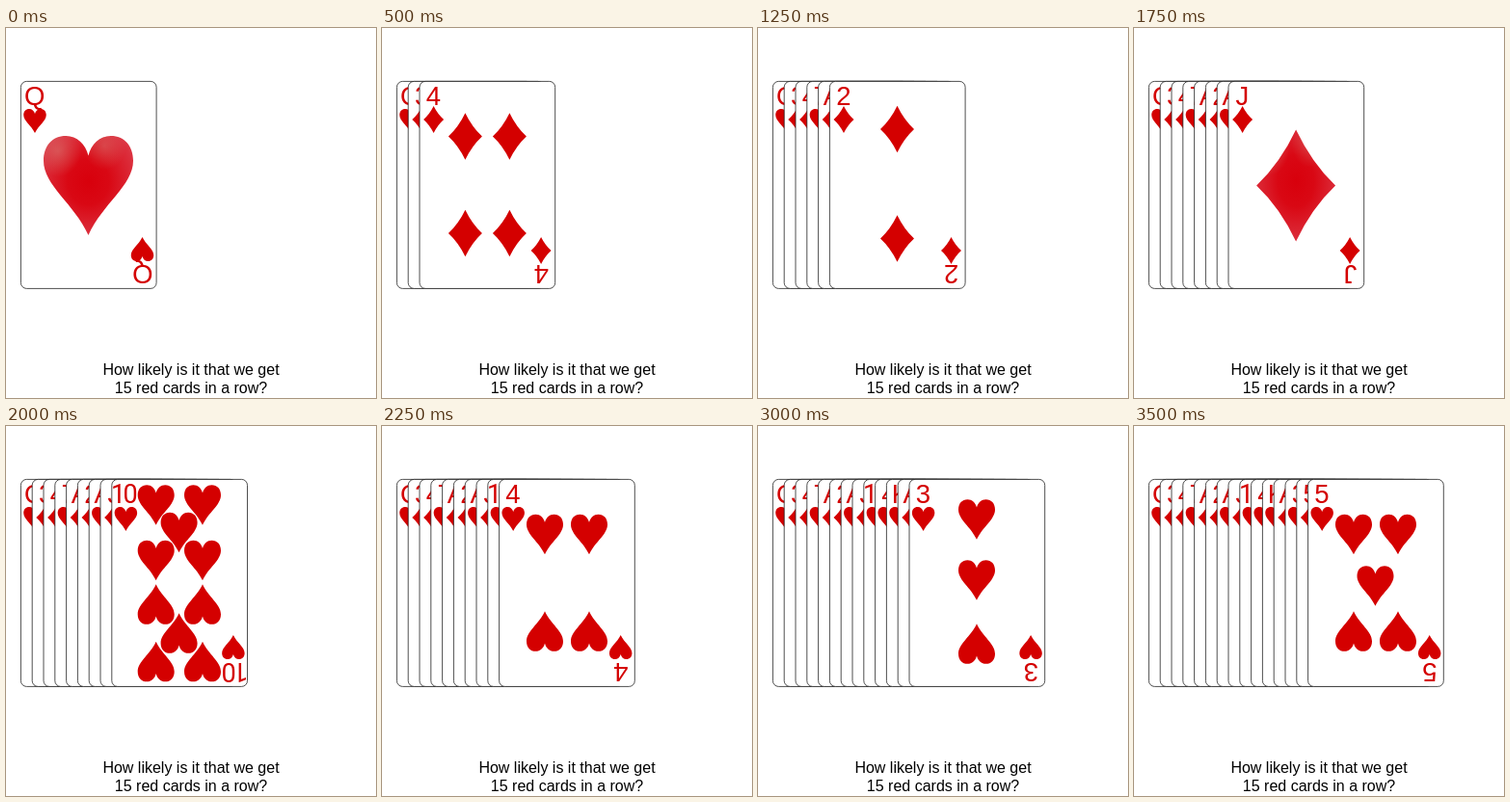
These frames come from a looping animation (384 px wide and 384 px high, 4 s). An HTML page:

```html
<!DOCTYPE html>
<html lang="en">
<head>
<meta charset="utf-8">
<title>Red cards in a row</title>
<style>
html, body { margin: 0; width: 100%; height: 100%; overflow: hidden; background: #fff; }
svg { display: block; width: 100%; height: 100%; }
text { text-anchor: middle; font-family: "Liberation Sans", Arial, sans-serif; }
.rank { font-size: 27.5px; fill: #d40000; }
.ten { font-family: Roboto, sans-serif; font-size: 27px; letter-spacing: -2.6px; }
.caption { font-size: 16px; fill: #000; }
</style>
</head>
<body>
<svg viewBox="0 0 384 384">
  <defs>
    <radialGradient id="body" cx=".5" cy=".46" r=".58">
      <stop offset="0" stop-color="#d8000c"/>
      <stop offset=".4" stop-color="#d90814"/>
      <stop offset="1" stop-color="#dc3543"/>
    </radialGradient>
    <radialGradient id="shineL" cx=".16" cy=".15" r=".26">
      <stop offset="0" stop-color="#d88078" stop-opacity=".5"/>
      <stop offset="1" stop-color="#d88078" stop-opacity="0"/>
    </radialGradient>
    <radialGradient id="shineR" cx=".68" cy=".1" r=".24">
      <stop offset="0" stop-color="#d88078" stop-opacity=".4"/>
      <stop offset="1" stop-color="#d88078" stop-opacity="0"/>
    </radialGradient>
  </defs>
  <g id="cards"></g>
  <text class="caption" x="192" y="360">How likely is it that we get</text>
  <text class="caption" x="192" y="379">15 red cards in a row?</text>
</svg>
<script>
const RED = '#d40000', STEP = 250, LOOP = 4000;
const MID_X = 70.75, MID_Y = 163;

// Suit outlines in a unit box centred on the origin
const SHAPES = {
  H: 'M0-.3C.03-.42 .13-.5 .25-.5C.4-.5 .5-.4 .5-.25C.5 0 .16 .18 0 .5' +
     'C-.16 .18-.5 0-.5-.25C-.5-.4-.4-.5-.25-.5C-.13-.5-.03-.42 0-.3Z',
  D: 'M0-.5Q.2-.2 .5 0Q.2 .2 0 .5Q-.2 .2-.5 0Q-.2-.2 0-.5Z'
};
const SIZES = {
  H: { small: [23.5, 25], pip: [38, 41.5], big: [93, 103] },
  D: { small: [21, 28], pip: [35, 48.5], big: [82, 116] }
};

// Pips: [x, y, upside down]
const pair = (x1, x2, y, flip) => [[x1, y, flip], [x2, y, flip]];
const wide = (y, flip) => pair(46.3, 94.6, y, flip);
const corners = [...pair(47.8, 93.8, 112.5), ...pair(47.8, 93.8, 213, true)];
const LAYOUTS = {
  A: [[70.5, 163]],
  2: [[70.5, 105], [70.5, 218.5, true]],
  3: [[70.4, 97], [70.4, 160], [70.4, 226, true]],
  4: corners,
  5: [...corners, [70.3, 166]],
  7: [...wide(82.5), [70.8, 122.5], ...wide(166), [46.3, 240.5, true], [94.6, 242, true]],
  10: [...wide(82), [70.2, 110.5], ...wide(139.5),
       ...wide(185, true), [70.2, 215, true], ...wide(244.5, true)]
};
const DEAL = 'QH 3D 4D 7H AD 2D AH JD 10H 4H KH AD 3H 5D 5H'.split(' ');

function suit(kind, size, x, y, flip, fill = RED) {
  const [w, h] = SIZES[kind][size];
  return `<path d="${SHAPES[kind]}" fill="${fill}" ` +
    `transform="translate(${x} ${y}) scale(${w} ${flip ? -h : h})"/>`;
}

function cardMarkup(code, i) {
  const kind = code.slice(-1), rank = code.slice(0, -1), ten = rank === '10';
  const index = `<text class="rank${ten ? ' ten' : ''}" x="${ten ? 12.2 : 14.8}" y="79.7">${rank}</text>` +
    suit(kind, 'small', 15, kind === 'H' ? 96.5 : 95);
  const face = LAYOUTS[rank]
    ? LAYOUTS[rank].map(([x, y, flip]) => suit(kind, 'pip', x, y, flip)).join('')
    : ['body', 'shineL', 'shineR'].map(id => suit(kind, 'big', 70.5, 163.5, false, `url(#${id})`)).join('');
  return `<g transform="translate(${(15 + 11.8 * i).toFixed(1)} 0)">` +
    '<rect x=".4" y="55.4" width="140.7" height="215" rx="6" fill="#fff" stroke="#222" stroke-width=".8"/>' +
    face + index + `<g transform="rotate(180 ${MID_X} ${MID_Y})">${index}</g></g>`;
}

const table = document.getElementById('cards');
table.innerHTML = DEAL.map(cardMarkup).join('');
const cards = [...table.children];

function draw(ms) {
  const t = ms % LOOP;
  cards.forEach((card, i) => card.setAttribute('visibility', t >= i * STEP ? 'visible' : 'hidden'));
}

let start;
function tick(now) {
  start ??= now;
  draw(Math.max(0, now - start));
  requestAnimationFrame(tick);
}
draw(0);
requestAnimationFrame(tick);
</script>
</body>
</html>
```
